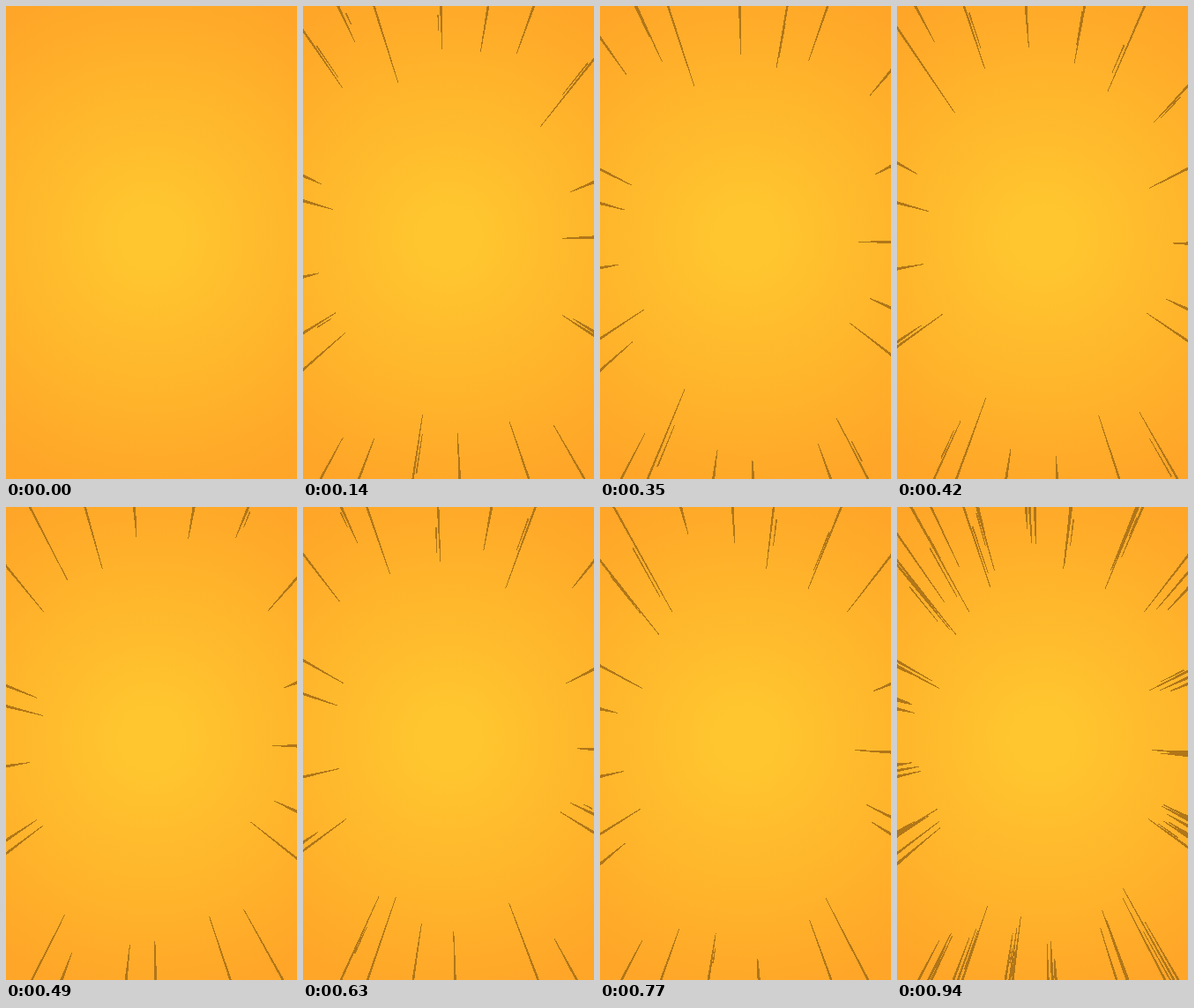
Write an HTML page that moves like this. It is 330 by 536 pixels and loops after 1.04 s.

```html
<!DOCTYPE html>
<html lang="en">
<head>
<meta charset="utf-8">
<title>Speed lines</title>
<style>
html, body { margin: 0; width: 100%; height: 100%; overflow: hidden; }
body { background: radial-gradient(circle at 165px 262px, #ffc62f 35px, #ffa528 300px); }
svg { display: block; }
</style>
</head>
<body>
<svg width="330" height="536" viewBox="0 0 330 536"><path id="ink" fill="#b07619" shape-rendering="crispEdges"/></svg>
<script>
const CX = 165, CY = 268;      // centre of the stage
const RX = 120, RY = 200;      // clear ellipse that the rays stay out of
const STEP = 70, LAST = 940, LOOP = 1040, FINALE = 11;
// Directions, in degrees round the ellipse, that every burst wavers about.
const SLOTS = [1, 18, 23, 48, 60, 87, 103, 122, 130, 154, 159,
  172, 191, 196, 219, 230, 243, 266, 284, 303, 325, 345];
const ink = document.getElementById('ink');

function seeded(seed) {
  let n = seed * 7919;
  return () => {
    n = (n * 16807 + 11) % 2147483647;
    return n / 2147483647;
  };
}

// A tapered stroke, thin at the tip (x, y) and wide at its outer end (u, v).
function stroke(x, y, u, v, half) {
  const len = Math.hypot(u - x, v - y);
  const nx = (y - v) / len, ny = (u - x) / len;
  const at = (px, py, r) => `${(px + nx * r).toFixed(2)} ${(py + ny * r).toFixed(2)}`;
  return `M${at(x, y, .45)}L${at(u, v, half)} ${at(u, v, -half)} ${at(x, y, -.45)}Z`;
}

function burst(seed) {
  const rand = seeded(seed);
  const spread = r => (rand() * 2 - 1) * r;
  let d = '';
  for (const slot of SLOTS) {
    const a = (slot + spread(3)) * Math.PI / 180;
    const ex = RX * Math.cos(a), ey = RY * Math.sin(a);
    const edge = Math.min(CX / Math.abs(ex), CY / Math.abs(ey));
    const k = 1 + (edge - 1) * rand() * .7;
    const x = CX + ex * k, y = CY + ey * k;
    const u = CX + ex * edge * 1.01, v = CY + ey * edge * 1.01;
    const len = Math.hypot(u - x, v - y);
    d += stroke(x, y, u, v, Math.max(1.3, 2.1 - len / 90));

    // Long rays sometimes shed a thin splinter alongside.
    if (rand() < len / 200) {
      const side = spread(5) / len, from = .15 + rand() * .3, to = from + .3 + rand() * .3;
      const mx = (v - y) * side, my = (x - u) * side;
      const on = s => [x + (u - x) * s + mx, y + (v - y) * s + my];
      d += stroke(...on(from), ...on(to), .9);
    }
  }
  return d;
}

// Each step is a fresh burst until the finale, where bursts pile up.
function scene(step) {
  if (step === 0) return '';
  let d = '';
  for (let i = Math.min(step, FINALE); i <= step; i++) d += burst(i);
  return d;
}

let shown = -1;

function tick(now) {
  const t = now % LOOP;
  const step = t < LAST ? Math.min(12, Math.floor(t / STEP)) : 13;
  if (step !== shown) ink.setAttribute('d', scene(shown = step));
  requestAnimationFrame(tick);
}
tick(0);
</script>
</body>
</html>
```
